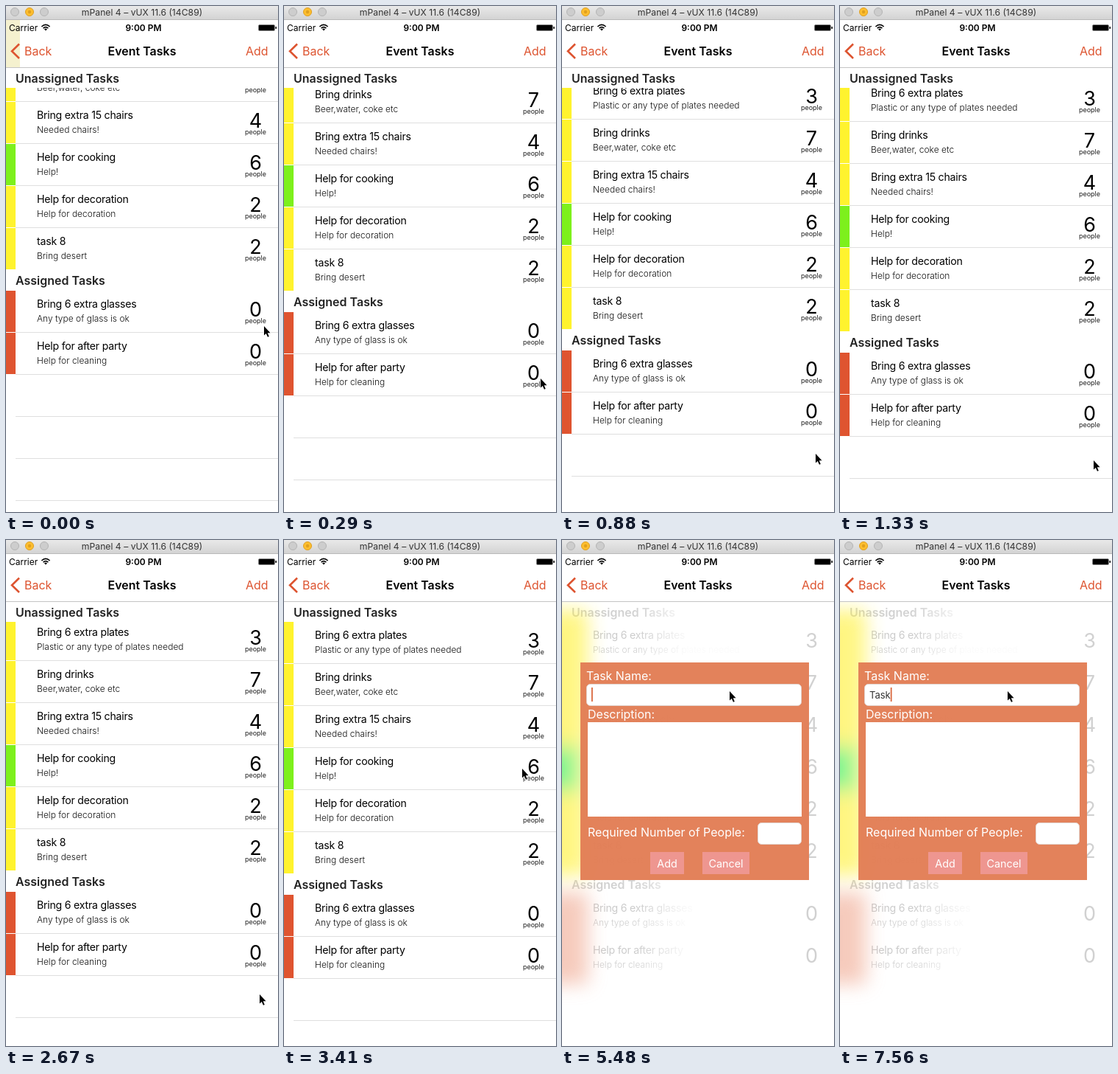
Write an HTML page that moves like this. It is 370 px wide and 686 px high and loops after 8000 ms.

```html
<!DOCTYPE html>
<html lang="en">
<head>
<meta charset="utf-8">
<title>Event Tasks</title>
<style>
html, body { margin: 0; width: 100%; height: 100%; overflow: hidden; background: #fff; }
svg { display: block; font-family: Inter, Roboto, sans-serif; }
.nav, .label { font-size: 16px; }
.nav { fill: #dd5430; }
.label { fill: #fff; }
.head { font-size: 16px; font-weight: 600; fill: #222; }
.name { font-size: 14.2px; letter-spacing: -.25px; }
.note { font-size: 12px; font-weight: 300; fill: #111; }
.count { font-size: 27px; text-anchor: middle; }
.people { font-size: 9px; text-anchor: middle; fill: #222; }
.button { font-size: 14.4px; fill: #fff; text-anchor: middle; }
.line { fill: #dfdfdf; }
.dim .bar, .dim .line, .dim .people { display: none; }
</style>
</head>
<body>
<svg width="370" height="686" viewBox="0 0 370 686">
  <defs>
    <linearGradient id="chrome" x2="0" y2="1">
      <stop stop-color="#e9e9e9"/><stop offset="1" stop-color="#d2d2d2"/>
    </linearGradient>
    <linearGradient id="veil">
      <stop stop-color="#fff" stop-opacity=".78"/>
      <stop offset=".27" stop-color="#fff" stop-opacity=".8"/>
      <stop offset=".46" stop-color="#fff" stop-opacity=".98"/>
      <stop offset=".85" stop-color="#fff" stop-opacity=".98"/>
      <stop offset=".88" stop-color="#fff" stop-opacity=".82"/>
    </linearGradient>
    <filter id="blur" x="-50%" y="-20%" width="200%" height="140%"><feGaussianBlur stdDeviation="13"/></filter>
    <clipPath id="listClip"><path d="M0 111H370V686H0z"/></clipPath>
    <clipPath id="bodyClip"><path d="M0 84H370V686H0z"/></clipPath>
  </defs>

  <g id="page">
    <g clip-path="url(#listClip)"><g id="list"></g></g>
    <text class="head" x="13" y="104">Unassigned Tasks</text>
  </g>

  <g id="dialog">
    <path d="M0 84H370V686H0z" fill="url(#veil)"/>
    <g clip-path="url(#bodyClip)"><g filter="url(#blur)" opacity=".6">
      <path d="M-40 95H35V455H-40z" fill="#fff02e"/>
      <path d="M-40 278H24V342H-40z" fill="#2cf04c"/>
      <path d="M-40 478H35V602H-40z" fill="#f0a890"/>
    </g></g>
    <path d="M25 166H336V461H25z" fill="#e37e56" fill-opacity=".97"/>
    <g fill="#fff">
      <rect x="33.5" y="195.5" width="292" height="29" rx="5" stroke="#e2d5d0"/>
      <rect x="35" y="247" width="291" height="128"/>
      <rect x="266.5" y="383.5" width="59" height="29" rx="5" stroke="#e2d5d0"/>
    </g>
    <text class="label" x="33" y="190">Task Name:</text>
    <text class="label" x="35" y="242">Description:</text>
    <text class="label" x="35" y="402">Required Number of People:</text>
    <path d="M120 423H166V453H120zM191 423H255V453H191z" fill="#ee9690"/>
    <text class="button" x="143" y="444">Add</text>
    <text class="button" x="223" y="444">Cancel</text>
    <text id="typed" x="40" y="214.5" font-size="13" fill="#333"></text>
    <rect id="caret" y="200" width="1.8" height="19" fill="#d9683f"/>
  </g>

  <path d="M0 19H370V83H0z" fill="#fff"/>
  <path id="tint" d="M0 19H19V83H0z" fill="#f5f1cf"/>
  <path d="M0 83H370V84H0z" fill="#c4c4c4"/>
  <path d="M0 0H370V19H0z" fill="url(#chrome)"/>
  <path d="M0 18H370V19H0z" fill="#b9b9b9"/>
  <g fill="#cdcdcd" stroke="#b4b4b4">
    <circle cx="12" cy="8" r="5.5"/>
    <circle cx="32" cy="8" r="5.5" fill="#fdbe2e" stroke="#dd9e22"/>
    <circle cx="52" cy="8" r="5.5"/>
  </g>
  <circle cx="32" cy="8" r="2.2" fill="#e0a020"/>
  <text x="185" y="12.7" font-size="12.2" fill="#333" text-anchor="middle">mPanel 4 – vUX 11.6 (14C89)</text>

  <text x="4" y="33.5" font-size="12">Carrier</text>
  <g fill="none" stroke="#000" stroke-width="1.6">
    <path d="M48.4 28Q54 22.6 59.6 28M50.6 30.2Q54 27 57.4 30.2"/>
  </g>
  <path d="M52 31.4Q54 29.8 56 31.4L54 33.6z"/>
  <text x="187" y="33.5" font-size="12" font-weight="600" text-anchor="middle">9:00 PM</text>
  <rect x="343.5" y="25.5" width="22" height="8" rx="1.5" stroke="#888"/>
  <rect x="366.5" y="28" width="1.5" height="3"/>

  <path d="M18 51.5L8 61.3L18 71" fill="none" stroke="#dd5430" stroke-width="2.6"/>
  <text class="nav" x="25" y="67">Back</text>
  <text class="head" x="185" y="67" text-anchor="middle" style="fill:#000">Event Tasks</text>
  <text class="nav" id="add" x="326" y="67">Add</text>

  <path id="cursor" d="M1 1V13.6L3.8 11L6 15.8L7.8 15L5.8 10.2H9.6z" stroke="#fff" stroke-width="2" paint-order="stroke"/>
</svg>

<script>
const $ = id => document.getElementById(id);
const LOOP = 8000, TICK = LOOP / 54, ROW = 57;
const YELLOW = '#fff32e', GREEN = '#7df01c', RED = '#df5430';

const open = [
  ['Bring 6 extra plates', 'Plastic or any type of plates needed', 3, YELLOW],
  ['Bring drinks', 'Beer,water, coke etc', 7, YELLOW],
  ['Bring extra 15 chairs', 'Needed chairs!', 4, YELLOW],
  ['Help for cooking', 'Help!', 6, GREEN],
  ['Help for decoration', 'Help for decoration', 2, YELLOW],
  ['task 8', 'Bring desert', 2, YELLOW]
];
const taken = [
  ['Bring 6 extra glasses', 'Any type of glass is ok', 0, RED],
  ['Help for after party', 'Help for cleaning', 0, RED]
];

const line = y => `<rect class="line" x="13" y="${y + 56}" width="357" height="1"/>`;
const row = (y, [name, note, count, color], last) => `
  <rect class="bar" y="${y}" width="13" height="56" fill="${color}"/>
  <text class="name" x="42" y="${y + 23}">${name}</text>
  <text class="note" x="42" y="${y + 42}">${note}</text>
  <text class="count" x="339.5" y="${y + 35}">${count}</text>
  <text class="people" x="339.5" y="${y + 44}">people</text>` + (last ? '' : line(y));

$('list').innerHTML =
  open.map((task, i) => row(111 + i * ROW, task, i === 5)).join('') +
  '<text class="head" x="13" y="473">Assigned Tasks</text>' +
  taken.map((task, i) => row(481 + i * ROW, task)).join('') +
  [2, 3, 4].map(i => line(481 + i * ROW)).join('');

// Keys are [tick, values...]
const scroll = [[0, -95], [2, -66], [4, -32], [5, -20], [6, -14], [7, -11], [17, -11], [18, -4], [19, 0]];
const path = [
  [0, 350, 433], [2, 348, 504], [4, 345, 577], [5, 344, 598], [7, 344, 613], [8, 344, 613], [9, 344, 615],
  [20, 344, 615], [21, 340, 572], [22, 331, 448], [23, 323, 309], [24, 320, 215], [25, 329, 142],
  [26, 343, 96], [27, 351, 74], [28, 338, 66], [30, 338, 66], [31, 336, 71], [32, 318, 105],
  [33, 275, 160], [34, 240, 194], [35, 227, 204]
];
const typing = [[0, ''], [45, 'T'], [49, 'Ta'], [50, 'Tas'], [51, 'Task']];
const blink = [[0, 0], [37, 1], [41, .5], [42, 0], [44, .5], [45, 1], [48, .5], [49, 1]];

const held = (keys, k) => keys.filter(key => key[0] <= k).pop();
function lerp(keys, k) {
  const a = held(keys, k), b = keys.find(key => key[0] > k) || a;
  const p = a === b ? 0 : (k - a[0]) / (b[0] - a[0]);
  return a.slice(1).map((v, i) => v + (b[i + 1] - v) * p);
}
const show = (id, on) => $(id).style.display = on ? '' : 'none';

function draw(time) {
  const k = Math.min(53, Math.floor((time % LOOP + 9) / TICK));
  const modal = k >= 29;
  $('list').setAttribute('transform', `translate(0 ${Math.round(lerp(scroll, k)[0])})`);
  $('cursor').setAttribute('transform', `translate(${lerp(path, k).map(Math.round)})`);
  $('page').classList.toggle('dim', modal);
  show('dialog', modal);
  show('tint', k < 1);
  $('add').style.opacity = k === 29 || k === 30 ? .25 : 1;
  $('typed').textContent = held(typing, k)[1];
  $('caret').setAttribute('x', 40 + (modal ? $('typed').getComputedTextLength() : 0));
  $('caret').style.opacity = held(blink, k)[1];
}

const start = performance.now();
function frame() {
  draw(performance.now() - start);
  requestAnimationFrame(frame);
}
frame();
</script>
</body>
</html>
```
